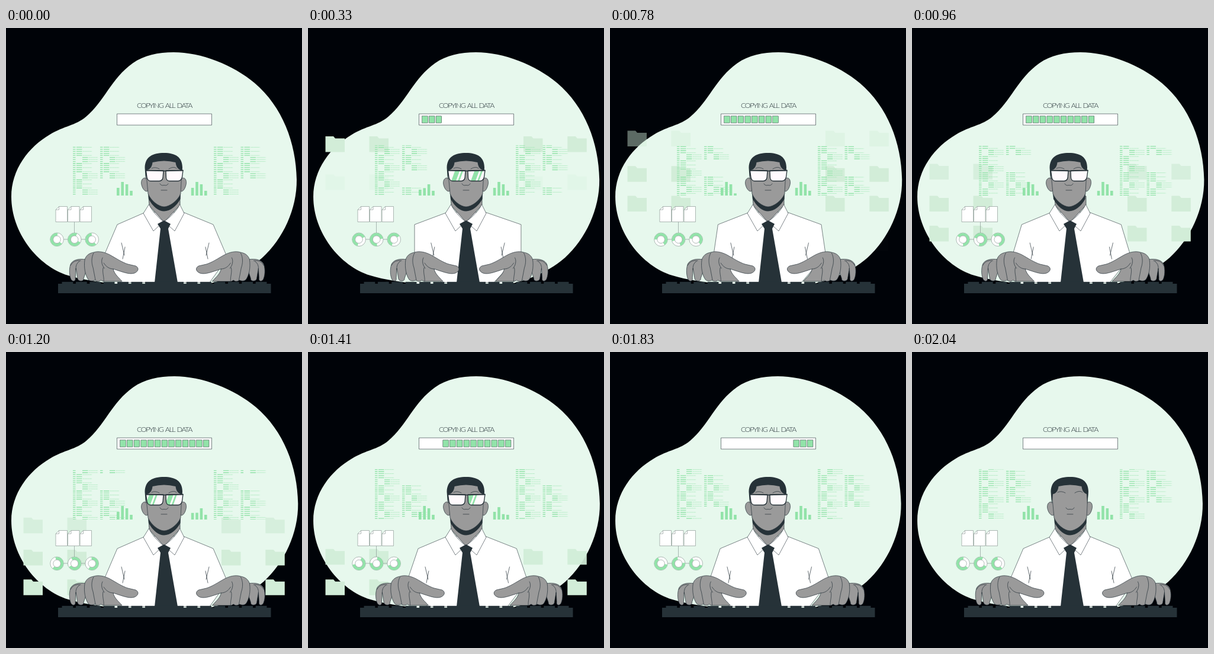
Recreate the animation shown at these times as an HTML page. Size 500x500 px, loop 2.07 s.

```html
<!DOCTYPE html>
<html lang="en">
<head>
<meta charset="utf-8">
<title>Copying all data</title>
<style>
html, body { margin: 0; width: 100%; height: 100%; overflow: hidden; background: #000308; }
svg { display: block; width: 100vw; height: 100vh; }
.ink { fill: #263238; }
.line { fill: none; stroke: #263238; stroke-width: .7; stroke-linecap: round; stroke-linejoin: round; }
.skin { fill: #9a9a9a; stroke: #263238; stroke-width: .7; stroke-linejoin: round; }
.white { fill: #fff; stroke: #263238; stroke-width: .6; stroke-linejoin: round; }
.green { fill: #92e3a9; }
.code { fill: none; stroke: #92e3a9; stroke-width: 1.3; }
.dots { stroke-width: 1; stroke-dasharray: 1.2 1.2; }
.block { fill: #92e3a9; stroke: #263238; stroke-width: .5; }
.folder { fill: #d2edd8; }
.lens { fill: #fffafd; }
.rim { stroke-width: 1.3; }
.thin { stroke: #7d8a86; stroke-width: .6; }
text { font: 300 12.5px Lato, "Open Sans", sans-serif; letter-spacing: -1.45px; word-spacing: 1.8px; fill: #263238; }
</style>
</head>
<body>
<svg viewBox="0 0 500 500">
  <defs>
    <clipPath id="window"><rect x="100" y="198" width="350" height="85"/></clipPath>
    <path id="lensL" d="M236.500 240.500L266 241L265 253Q264 258 259 258.500H244Q239 258 238 252Z"/>
    <path id="lensR" d="M270 241L299 240.500L297.500 252Q296 258 291 258.500H276Q271 258 270.500 253Z"/>
    <clipPath id="lenses"><use href="#lensL"/><use href="#lensR"/></clipPath>
    <g id="hand">
      <path class="skin" d="M135 391C122 389 112 392 109 399C106 408 107 419 110 425C113 429 118 428 117 422L118 406L121 424C123 429 132 428 131 423L137 405Z"/>
      <path class="line" d="M109 401Q114 391 126 393M118 408Q117 398 124 394"/>
      <path class="skin" d="M133 391C136 382 143 380 148 379C157 376 167 379 175 383C186 389 196 396 206 399L219 402C225 405 224 411 217 414C208 417 197 412 181 407C183 416 190 421 196 428H164L160 426Q156 430 150 426Q143 429 139 425C134 418 131 405 133 391Z"/>
      <path class="line" d="M148 380C144 387 144 397 147 405L151 426M163 388Q160 393 163 401L166 406M181 407C174 407 169 403 165 397M164 405C162 413 166 421 165 428"/>
    </g>
    <g id="keys"></g>
  </defs>

  <path id="blob" fill="#e7f8ed" d="M283 41C330 41 383 62 420 93C467 133 490 194 491 256C491.500 306 468 356 433 388C402 415 350 438 290 438C235 438 150 432 105 418C53 402 9 345 9 285C9 239 38 201 74 180C99 165 117 165 135 150C166 124 178 85 214 59.500C233 46 257 41 283 41Z"/>
  <g id="folders"></g>
  <text x="267.500" y="135" text-anchor="middle">COPYING ALL DATA</text>
  <rect class="white" x="187.500" y="145" width="160" height="19"/>
  <g id="blocks"></g>
  <g clip-path="url(#window)"><g id="code"></g></g>
  <g id="bars"></g>
  <g id="files"><path class="line thin" d="M115.500 327.500V357M86 357H145"/></g>

  <path id="shirt" class="white"/>
  <path id="folds" class="line"/>
  <path class="skin" d="M241 284L242 300L267 328L294 299V284Z"/>
  <path class="white" d="M241.500 298L232 313L249 343L266 327C256 319 247 310 241.500 298ZM293.500 298L301 313L285 343L267 327C278 319 288 310 293.500 298Z"/>
  <path class="ink" d="M256 331L267 325L278 331L274 339L290 430H251L261 339Z"/>

  <g id="head">
    <path class="skin" d="M239 255C232 250 227 257 229 265C231 273 236 278 240 275ZM295 255C302 250 306 257 304 265C302 273 298 278 294 275Z"/>
    <path class="ink" d="M240 280L241 289C248 302 258 309.500 267 309.500C277 309.500 288 301 294.500 289L295 280Z"/>
    <path class="skin" d="M236 236C236 222 246 217 266 217C287 217 297 222 297 240L295 280C290 292 276 302 267 302C258 302 245 292 240 280Z"/>
    <path class="ink" d="M236 257L234.500 236C235 217 248 211 267 211C286 211 298 218 298 236L296 257L295 240C289 238 287 232 286.500 227Q267 222 247.500 227C247 233 244 239 238 240Z"/>
    <path class="line" d="M246 237Q252 234 259 238M275 238Q283 233 288 237M260 263Q262 267 267 265.500Q272 267 274 263M262 274H272"/>
    <g id="glasses">
      <use href="#lensL" class="lens"/><use href="#lensR" class="lens"/>
      <g clip-path="url(#lenses)"><path id="shine" class="green" d="M244 240h8l-7 19h-8ZM255 240h3l-7 19h-3ZM277 240h8l-7 19h-8ZM288 240h3l-7 19h-3Z"/></g>
      <use href="#lensL" class="line rim"/><use href="#lensR" class="line rim"/>
      <path class="line rim" d="M236 240.500L267 241.500H270L299 240.500"/>
    </g>
  </g>

  <use id="left" href="#hand"/>
  <use id="right" href="#hand"/>
  <rect class="ink" x="88" y="432" width="359.500" height="16"/>
  <rect class="ink" x="235" y="428.800" width="65" height="4"/>
  <use href="#keys"/>
  <use href="#keys" transform="translate(535 0) scale(-1 1)"/>
</svg>
<script>
const LOOP = 2070, CYCLE = 2010, ROW = 3.44, PERIOD = ROW * 24;
const $ = id => document.getElementById(id);
const clamp = v => Math.max(0, Math.min(1, v));
const move = (el, x, y) => el.setAttribute('transform', `translate(${x} ${y})`);

function add(parent, tag, attrs) {
  const el = document.createElementNS('http://www.w3.org/2000/svg', tag);
  for (const k in attrs) el.setAttribute(k, attrs[k]);
  return $(parent).appendChild(el);
}

// Linear interpolation through [time, value] pairs
function track(t, points) {
  const i = points.findIndex(p => p[0] > t);
  if (i < 0) return points[points.length - 1][1];
  const [a, u] = points[i - 1], [b, v] = points[i];
  return u + (v - u) * (t - a) / (b - a);
}

for (let i = 0; i < 6; i++)
  add('keys', 'rect', { class: 'ink', x: 94.5 + 23.4 * i, y: 428.8, width: 18.8, height: 4 });

const blocks = Array.from({ length: 13 }, (_, i) =>
  add('blocks', 'rect', { class: 'block', x: 192.7 + 11.72 * i, y: 148.8, width: 9.6, height: 11.4 }));

const folders = Array.from({ length: 5 }, () =>
  add('folders', 'path', { class: 'folder', d: [29.5, 103.5, 364, 438.3].map(x =>
    `M${x} 0h13.500l3 3.500h16v23h-32.500z`).join('') }));

// Each code row: line number, statement (some indented), dotted tail
[[113, 24], [159, 16], [351, 24], [396.5, 16]].forEach(([x, rows]) => {
  let solid = '', dots = '';
  for (let r = 0; r < 48; r++) {
    if (r % 24 >= rows) continue;
    const y = 201.5 + ROW * r, n = r % 8, indent = n > 4 ? 10 : 0;
    solid += `M${x} ${y}h4.500M${x + 6 + indent} ${y}h9.500`;
    if (indent || n % 2 === 0) dots += `M${x + 17 + indent} ${y}h15`;
  }
  add('code', 'path', { class: 'code', d: solid });
  add('code', 'path', { class: 'code dots', d: dots });
});

const bars = [[187, 20], [312.8, 870]].flatMap(([x, start]) => [13, 23, 19, 8].map((h, i) => ({
  h, start: start + 200 * i,
  el: add('bars', 'rect', { class: 'green', x: x + 7.4 * i, width: 4.6 })
})));

for (const x of [84, 104.5, 125])
  add('files', 'path', { class: 'white thin', d: `M${x + 5.5} 301.500H${x + 19.5}V327.500H${x}V307ZV307H${x}` });

const rings = [[86, .65], [115.7, .74], [145.2, .6]].map(([x, part]) => {
  add('files', 'circle', { class: 'white thin', cx: x, cy: 357.3, r: 11.3 });
  const len = 2 * Math.PI * 8.8;
  const el = add('files', 'circle', { cx: x, cy: 357.3, r: 8.8, fill: 'none', stroke: '#92e3a9',
    'stroke-width': 4.6, 'stroke-dasharray': `${len * part} ${len}` });
  add('files', 'circle', { class: 'white thin', cx: x, cy: 357.3, r: 6.3 });
  return { el, x, part };
});

function drawShirt(o) {
  const mirror = x => 538 + o * .06 - x;
  const shoulder = 188 - o * .25, elbow = 164 + o * .5, y = 388 - o * .25, hem = 194 + o;
  $('shirt').setAttribute('d', `M236 311L${shoulder} 332L${elbow} ${y}L${hem} 430H${mirror(hem)}` +
    `L${mirror(elbow)} ${y}L${mirror(shoulder)} 332L299 311Z`);
  const x = 195 + o * .4;
  const fold = (x, d) => `M${x} 363L${x + 5 * d} 384M${x + 6 * d} 370L${x + 2 * d} 390`;
  $('folds').setAttribute('d', fold(x, 1) + fold(mirror(x), -1));
}

function draw(t) {
  const p = clamp(t / CYCLE);
  $('blob').setAttribute('transform', `translate(9 0) scale(${1 + .005 * Math.sin(Math.PI * p)} 1) translate(-9 0)`);

  const filled = Math.floor(t / 90), cleared = Math.floor((t - 1230) / 60);
  blocks.forEach((el, i) => el.style.display = i < filled && i >= cleared ? '' : 'none');

  folders.forEach((el, k) => {
    const enter = clamp((t - 60 - 240 * k) / 180), leave = clamp((t - 680 - 240 * k) / 180);
    move(el, 0, 183 + 50.3 * k + 17 * (1 - enter) - 17 * leave);
    el.setAttribute('opacity', clamp(enter * 1.5) * (1 - leave));
  });

  move($('code'), 0, -PERIOD * p);

  for (const { el, h, start } of bars) {
    const size = h * (1 - .55 * Math.sin(Math.PI * clamp((t - start) / 360)));
    el.setAttribute('y', 283 - size);
    el.setAttribute('height', size);
  }

  // The white gap starts at the right and turns once per cycle
  for (const { el, x, part } of rings)
    el.setAttribute('transform', `rotate(${-22 + 180 * (1 - part) + 360 * p} ${x} 357.3)`);

  const o = track(t, [[0, 0], [300, 32], [630, 32], [960, 10.5], [1200, 0], [1500, 10.5], [1740, 10.5], [2040, 0]]);
  move($('left'), o, 0);
  $('right').setAttribute('transform', `translate(${544.5 - o} 0) scale(-1 1)`);
  drawShirt(o);

  move($('head'), track(t, [[0, 0], [330, 0], [600, 2], [960, -2], [1200, 0]]), 0);

  const sweep = clamp((t - (t < 800 ? 130 : 1045)) / 420);
  move($('shine'), -24 + 60 * sweep, 0);
  $('shine').style.display = sweep > 0 && sweep < 1 ? '' : 'none';
  $('glasses').style.display = t < 2035 ? '' : 'none';
}

const begin = performance.now();
function tick() {
  draw((performance.now() - begin) % LOOP);
  requestAnimationFrame(tick);
}
tick();
</script>
</body>
</html>
```
